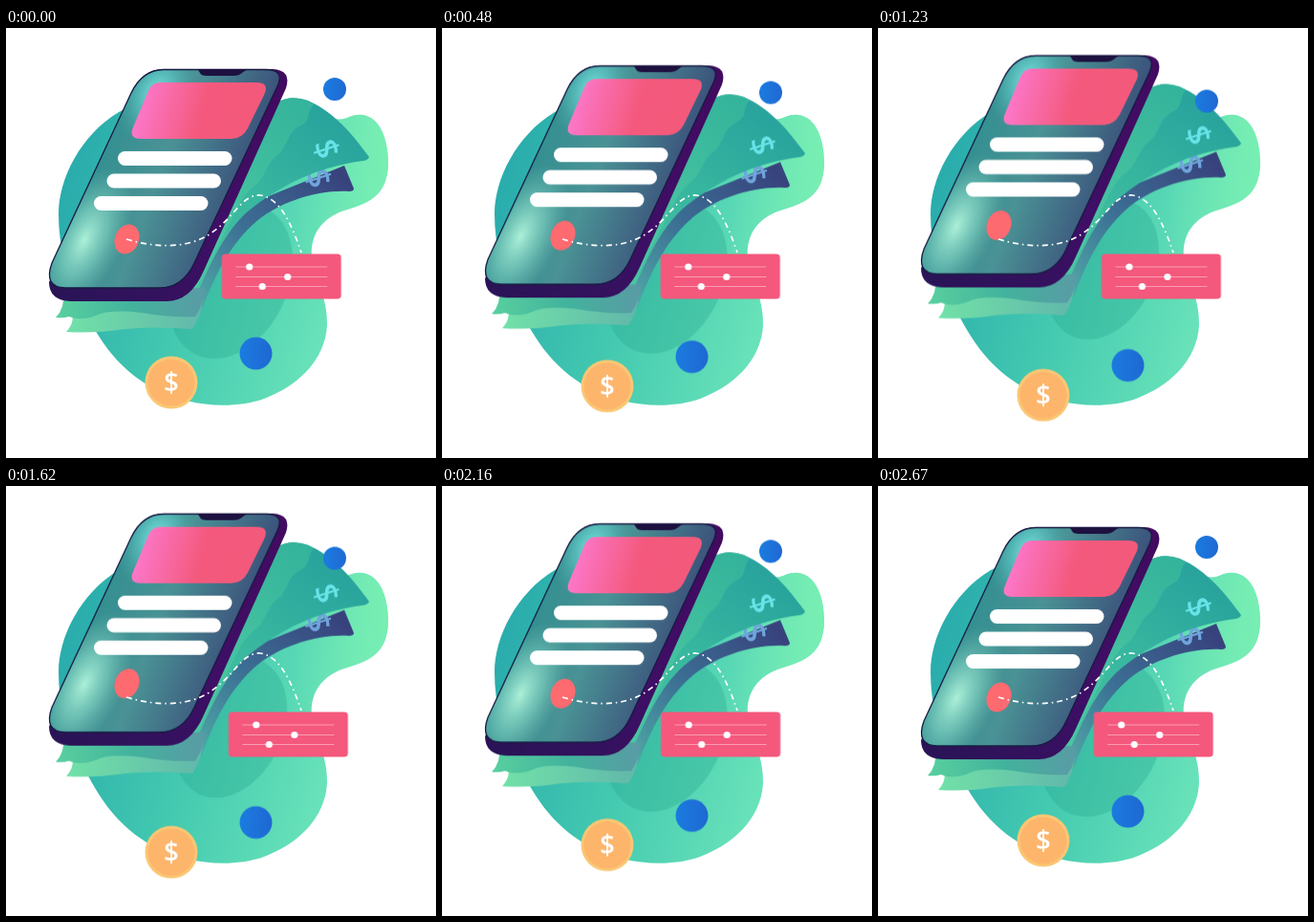
Recreate the animation shown at these times as an HTML page. Size 450 by 450 pixels, loop 2700 ms.

```html
<!DOCTYPE html>
<html lang="en">
<head>
<meta charset="utf-8">
<title>Mobile payment</title>
<style>
html, body { margin: 0; width: 100%; height: 100%; overflow: hidden; background: #fff; }
svg { display: block; width: 100vw; height: 100vh; }
text { font-family: "Open Sans", "Noto Sans", sans-serif; text-anchor: middle; }
#shade { transform-box: fill-box; transform-origin: center; }
</style>
</head>
<body>
<svg viewBox="0 0 450 450">
  <defs>
    <linearGradient id="blobFill" gradientUnits="userSpaceOnUse" x1="60" y1="190" x2="345" y2="270">
      <stop offset="0" stop-color="#2aadac"/>
      <stop offset=".5" stop-color="#43c9b0"/>
      <stop offset="1" stop-color="#68e2b9"/>
    </linearGradient>
    <linearGradient id="lobeFill" gradientUnits="userSpaceOnUse" x1="300" y1="0" x2="395" y2="0">
      <stop offset="0" stop-color="#7cf2b0" stop-opacity="0"/>
      <stop offset="1" stop-color="#7cf2b0" stop-opacity=".75"/>
    </linearGradient>
    <linearGradient id="navyFill" gradientUnits="userSpaceOnUse" x1="350" y1="155" x2="200" y2="290">
      <stop offset="0" stop-color="#38437e"/>
      <stop offset=".55" stop-color="#3c6f94"/>
      <stop offset="1" stop-color="#4fa8a6"/>
    </linearGradient>
    <linearGradient id="billFill" gradientUnits="userSpaceOnUse" x1="360" y1="90" x2="210" y2="300">
      <stop offset="0" stop-color="#27a19d"/>
      <stop offset=".5" stop-color="#38b79f"/>
      <stop offset="1" stop-color="#4cc6a4"/>
    </linearGradient>
    <linearGradient id="innerFill" gradientUnits="userSpaceOnUse" x1="330" y1="80" x2="210" y2="280">
      <stop offset="0" stop-color="#33b39b"/>
      <stop offset="1" stop-color="#52cda4"/>
    </linearGradient>
    <linearGradient id="stackFill" gradientUnits="userSpaceOnUse" x1="55" y1="0" x2="207" y2="0">
      <stop offset="0" stop-color="#58cf9f"/>
      <stop offset=".5" stop-color="#42b39d"/>
      <stop offset="1" stop-color="#5a9ba5"/>
    </linearGradient>
    <linearGradient id="backFill" gradientUnits="userSpaceOnUse" x1="60" y1="0" x2="200" y2="0">
      <stop offset="0" stop-color="#72e2a8"/>
      <stop offset="1" stop-color="#62b9ab"/>
    </linearGradient>
    <linearGradient id="bodyFill" gradientUnits="userSpaceOnUse" x1="60" y1="280" x2="290" y2="60">
      <stop offset="0" stop-color="#2a1457"/>
      <stop offset=".5" stop-color="#3f0f66"/>
      <stop offset="1" stop-color="#420b60"/>
    </linearGradient>
    <linearGradient id="screenFill" gradientUnits="userSpaceOnUse" x1="85" y1="130" x2="250" y2="190">
      <stop offset="0" stop-color="#2f8f90"/>
      <stop offset=".45" stop-color="#4a9295"/>
      <stop offset="1" stop-color="#3a4a78"/>
    </linearGradient>
    <radialGradient id="mint">
      <stop offset="0" stop-color="#b9fbe0" stop-opacity=".9"/>
      <stop offset=".5" stop-color="#95e6cf" stop-opacity=".5"/>
      <stop offset="1" stop-color="#7fcabb" stop-opacity="0"/>
    </radialGradient>
    <radialGradient id="cyan">
      <stop offset="0" stop-color="#7df0ea" stop-opacity=".9"/>
      <stop offset=".5" stop-color="#66d3d0" stop-opacity=".5"/>
      <stop offset="1" stop-color="#4fb0b0" stop-opacity="0"/>
    </radialGradient>
    <linearGradient id="headFill" gradientUnits="userSpaceOnUse" x1="138" y1="75" x2="270" y2="110">
      <stop offset="0" stop-color="#fd78cc"/>
      <stop offset=".3" stop-color="#f7669c"/>
      <stop offset=".5" stop-color="#f4597d"/>
      <stop offset="1" stop-color="#f3597a"/>
    </linearGradient>
    <linearGradient id="ballFill">
      <stop offset="0" stop-color="#1b7ce0"/>
      <stop offset="1" stop-color="#1f68d2"/>
    </linearGradient>
    <path id="face" d="M165 43.5H272Q292 43.5 284 61L197 246Q185 272 160 272H62Q39 271 48 246L131 68Q143 43.5 165 43.5Z"/>
    <clipPath id="faceClip"><use href="#face"/></clipPath>
  </defs>

  <path fill="url(#blobFill)" d="M55 195C55 158 78 112 118 88C165 66 240 66 285 76C315 82 338 101 357 94C383 82 400 105 400 142C399 176 380 183 354 191C330 199 318 217 320 240C323 263 337 282 336 311C334 350 302 376 270 388C232 401 188 394 156 378C114 356 93 320 75 281C64 257 55 229 55 195Z"/>
  <path fill="url(#lobeFill)" d="M300 110C320 98 342 99 357 94C383 82 400 105 400 142C399 176 380 183 354 191C330 199 318 217 320 236L300 236Z"/>
  <g id="shade"><ellipse cx="235" cy="265" rx="60" ry="85" transform="rotate(25 235 265)" fill="#22a58c" opacity=".33"/></g>

  <g id="wallet">
    <path fill="url(#navyFill)" d="M354 144L364 168Q364 171 359 171C328 169 285 181 258 206C234 228 218 260 205 295L186 300L240 190Z"/>
    <text transform="translate(327 157) rotate(72)" y="12" font-size="34" font-weight="600" fill="#70a5dc">$</text>
    <path fill="url(#billFill)" d="M268 92Q288 66 316 76C344 88 364 113 380 135Q379 138 374 139C325 145 285 166 253 192C228 214 212 250 195 290L180 290L250 130Z"/>
    <path fill="url(#innerFill)" d="M268 92Q288 66 316 76L322 80C314 88 320 96 309 102C293 109 296 124 284 133C272 142 272 157 260 165C244 178 238 198 230 212L200 270L180 280Z"/>
    <text transform="translate(335.500 126.500) rotate(72)" y="12" font-size="34" font-weight="600" fill="#68e4e8">$</text>

    <path fill="url(#backFill)" d="M63 318Q74 306 67 294L206 282Q204 304 195 315Q155 312 125 315Q92 320 63 318Z"/>
    <path fill="url(#stackFill)" d="M52 303Q62 293 60 276L208 272Q206 292 198 302Q168 303 142 298Q108 294 94 301Q78 307 66 302Q59 304 52 303Z"/>

    <path fill="url(#bodyFill)" d="M165 43H279Q299 44 293 63L207 254Q193 286 168 286H68Q45 285 45 266L131 68Q143 43 165 43Z"/>
    <g clip-path="url(#faceClip)">
      <use href="#face" fill="url(#screenFill)"/>
      <ellipse cx="82" cy="222" rx="82" ry="40" transform="rotate(-64 82 222)" fill="url(#mint)"/>
      <ellipse cx="157" cy="68" rx="55" ry="38" transform="rotate(-64 157 68)" fill="url(#cyan)"/>
    </g>
    <use href="#face" fill="none" stroke="#171a42" stroke-width="1.3"/>
    <path fill="#1d1140" d="M199 43H255Q250 44 247 47Q244 50 238 50H210Q204 50 203 47Q202 44 199 43Z"/>
    <path fill="url(#headFill)" d="M161 57H262Q275 57 271 68L253 105Q247 116 236 116H141Q128 116 133 104L148 68Q152 57 161 57Z"/>
    <g fill="#fff">
      <rect x="117" y="129" width="119.500" height="15" rx="7.500"/>
      <rect x="105.500" y="152.500" width="119.500" height="15" rx="7.500"/>
      <rect x="92" y="176" width="119.500" height="15" rx="7.500"/>
    </g>
    <ellipse cx="126.500" cy="221" rx="12.500" ry="16" transform="rotate(22 126.500 221)" fill="#fd6a70"/>
  </g>

  <path fill="none" stroke="#fff" stroke-width="1.7" stroke-dasharray="6 4 1.500 4" d="M126 221C155 230 188 231 211 217C239 200 246 174 266 175C288 178 300 209 309 235"/>

  <g id="card">
    <rect x="225.500" y="236.500" width="125" height="47" rx="4" fill="#f4587c"/>
    <path d="M240 250H336M240 260.500H336M240 270.500H336" stroke="#fa9db4" stroke-width="1"/>
    <g fill="#fff">
      <circle cx="254.500" cy="250" r="3.600"/>
      <circle cx="294.500" cy="260.500" r="3.600"/>
      <circle cx="268" cy="270.500" r="3.600"/>
    </g>
  </g>

  <g class="ball">
    <circle cx="344" cy="64" r="12" fill="url(#ballFill)"/>
    <circle cx="261.500" cy="340.500" r="17" fill="url(#ballFill)"/>
  </g>
  <g id="coin">
    <circle cx="173" cy="371" r="27.500" fill="#fac774"/>
    <circle cx="173" cy="371" r="24.500" fill="#fdb56b"/>
    <text x="173" y="381" font-size="28" font-weight="600" fill="#fff">$</text>
  </g>
</svg>
<script>
const LOOP = 2700;
const SINE = 'cubic-bezier(.37,0,.63,1)';
const move = (x, y, s = 1) => `translate(${x}px, ${y}px) scale(${s})`;

// selector, pose at the far end, easing, time of the far end, time back at rest
const parts = [
  ['#wallet', move(0, -15.3), SINE, 1440, 2520],
  ['#shade', move(0, -13, .9), SINE, 1440, 2520],
  ['#card', move(9.2, 0), 'linear', 1350, 2700],
  ['.ball', move(0, 12.8), SINE, 1350, 2700],
  ['#coin', move(0, 13.5), SINE, 1350, 2700]
];

for (const [selector, far, easing, peak, rest] of parts) {
  const home = move(0, 0);
  const frames = [
    { transform: home, easing, offset: 0 },
    { transform: far, easing, offset: peak / LOOP },
    { transform: home, offset: rest / LOOP }
  ];
  if (rest < LOOP) frames.push({ transform: home, offset: 1 });
  for (const el of document.querySelectorAll(selector)) {
    el.animate(frames, { duration: LOOP, iterations: Infinity }).startTime = 0;
  }
}
</script>
</body>
</html>
```
